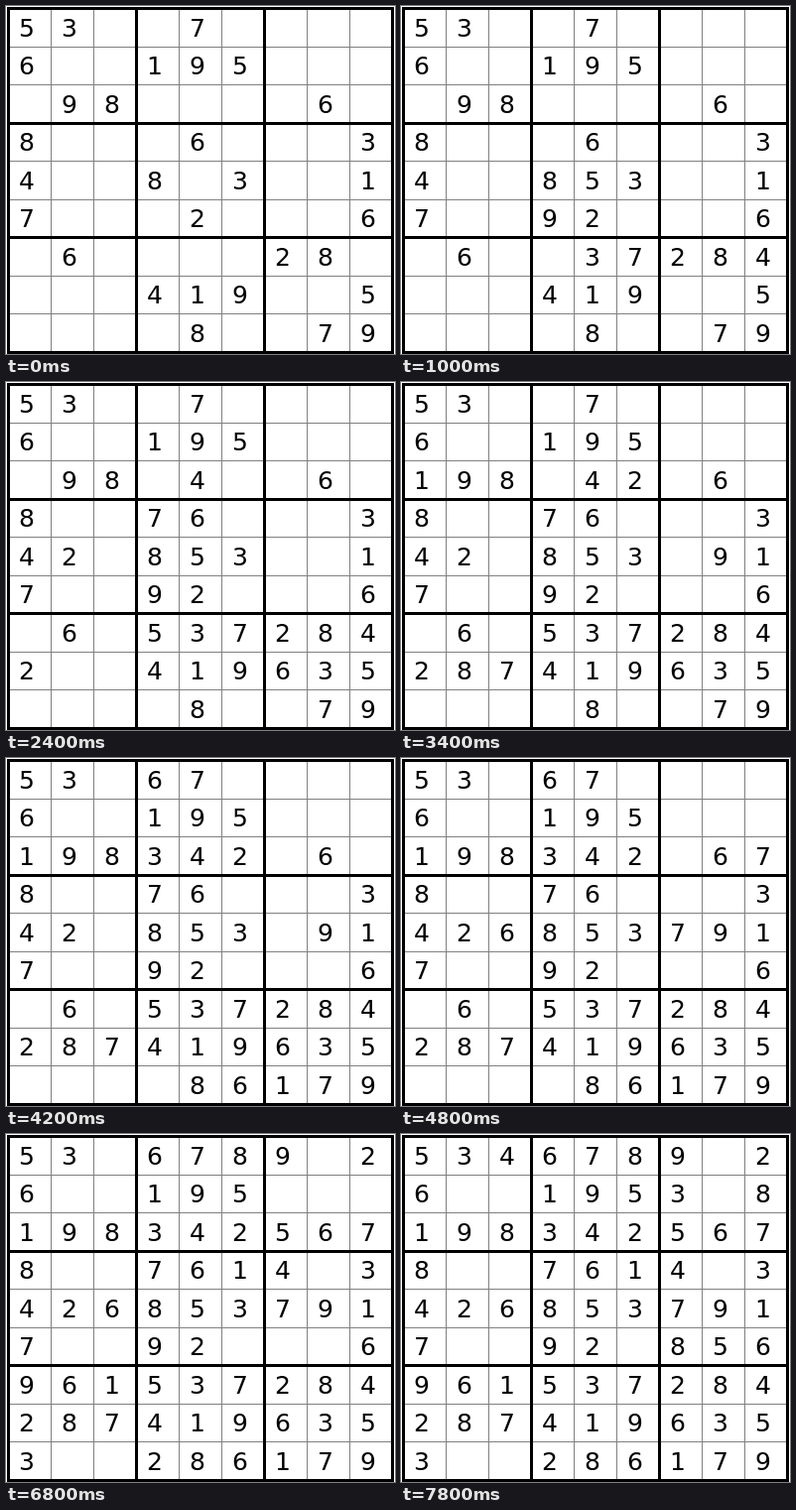
An HTML page with a canvas that plays this animation: 392x351 px, repeating every 8000 ms.

```html
<!DOCTYPE html>
<html lang="en">
<head>
<meta charset="utf-8">
<title>Sudoku solving</title>
<style>
  html, body { margin: 0; width: 100%; height: 100%; overflow: hidden; background: #fff; }
  canvas { display: block; }
</style>
</head>
<body>
<canvas id="board" width="392" height="351"></canvas>
<script>
const STEP_MS = 200, LOOP_MS = 8000;
const CELL_W = 43, CELL_H = 38.5;

const clues = [
  '53..7....', '6..195...', '.98....6.',
  '8...6...3', '4..8.3..1', '7...2...6',
  '.6....28.', '...419..5', '....8..79'
];
const solution = [
  '534678912', '672195348', '198342567',
  '859761423', '426853791', '713924856',
  '961537284', '287419635', '345286179'
];

// Cells as row and column digits, one line per solver pass.
const fillOrder = `
  55 64 75 76 79 88
  35 44 52 74 81 87
  31 36 58 82 83 96 97
  14 34 39 53 57 71 91 94
  16 37 47 73
  17 19 46 67 68
  13 27 29`.trim().split(/\s+/).map(cell => [cell[0] - 1, cell[1] - 1]);

const ctx = document.getElementById('board').getContext('2d');
const lineX = i => 2 + CELL_W * i;
const lineY = i => Math.floor(2.5 + CELL_H * i);

function drawLine(i, width, color) {
  const half = (width - 1) / 2;
  const left = lineX(0) - half, top = lineY(0) - half;
  ctx.fillStyle = color;
  ctx.fillRect(lineX(i) - half, top, width, lineY(9) - lineY(0) + width);
  ctx.fillRect(left, lineY(i) - half, lineX(9) - lineX(0) + width, width);
}

function drawDigit(row, col, digit) {
  ctx.fillText(digit, 13 + CELL_W * col, Math.floor(31 + CELL_H * row));
}

function draw(filled) {
  ctx.fillStyle = '#fff';
  ctx.fillRect(0, 0, 392, 351);
  for (let i = 1; i < 9; i++) if (i % 3) drawLine(i, 1, '#808080');
  for (let i = 0; i <= 9; i += 3) drawLine(i, 3, '#000');

  ctx.font = '25px "DejaVu Sans", sans-serif';
  clues.forEach((line, row) => [...line].forEach((digit, col) => {
    if (digit !== '.') drawDigit(row, col, digit);
  }));
  for (const [row, col] of fillOrder.slice(0, filled)) {
    drawDigit(row, col, solution[row][col]);
  }
}

const start = performance.now();
function tick() {
  const time = (performance.now() - start) % LOOP_MS;
  draw(Math.floor(time / STEP_MS));
  requestAnimationFrame(tick);
}
tick();
</script>
</body>
</html>
```
